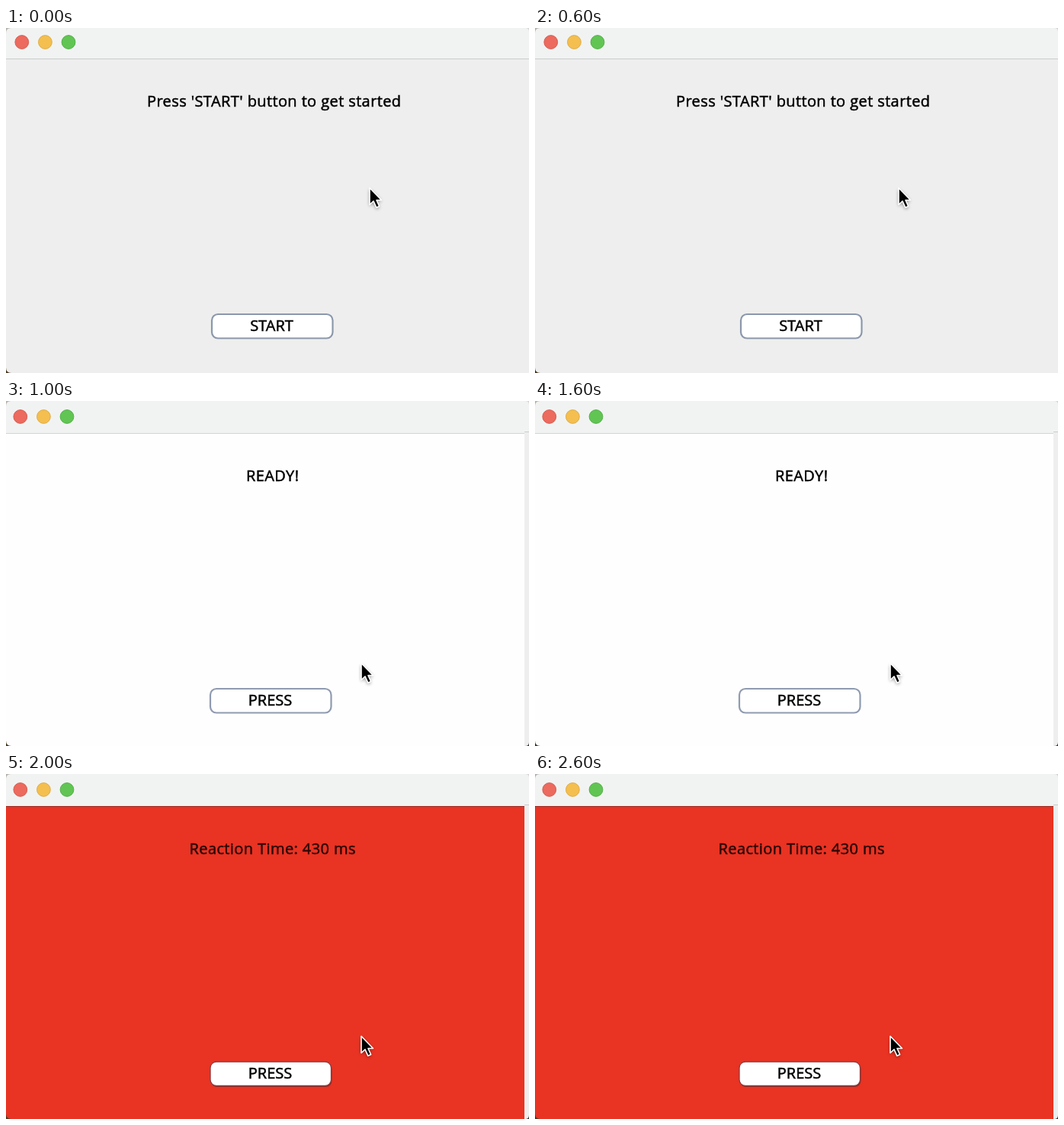
Recreate the animation shown at these times as an HTML page with a canvas. Size 686 by 452 pixels, loop 3000 ms.

```html
<!DOCTYPE html>
<html lang="en">
<head>
<meta charset="utf-8">
<title>Reaction timer</title>
<style>
html, body { margin: 0; width: 100%; height: 100%; overflow: hidden; background: #eee; }
canvas { display: block; }
</style>
</head>
<body>
<canvas id="stage" width="686" height="452"></canvas>
<script>
const W = 686, H = 452, STEP = 1000;
const ctx = document.getElementById("stage").getContext("2d");

const scenes = [
  { fill: "#eeeeee", rule: "#cbcccc", title: "Press 'START' button to get started",
    button: "START", border: "#8b98ac", dx: 0, dy: 0, cursor: [476, 208] },
  { fill: "#fefefe", rule: "#d3d5d4", title: "READY!",
    button: "PRESS", border: "#8f9bb0", dx: -2, dy: 2, cursor: [465, 342] },
  { fill: "#e93323", rule: "#982a20", title: "Reaction Time: 430 ms", ink: "#2a0704",
    button: "PRESS", border: "#8c3a3c", dx: -2, dy: 2, cursor: [465, 342] }
];

function rect(color, x, y, w, h) {
  ctx.fillStyle = color;
  ctx.fillRect(x, y, w, h);
}

function label(text, x, y, spacing, color = "#000") {
  ctx.font = '20px "Open Sans", "Noto Sans", sans-serif';
  ctx.letterSpacing = spacing + "px";
  ctx.textAlign = "center";
  ctx.fillStyle = ctx.strokeStyle = color;
  ctx.lineWidth = 0.5;
  ctx.fillText(text, x, y);
  ctx.strokeText(text, x, y);
}

function light(x, y, fill, edge) {
  ctx.beginPath();
  ctx.arc(x, y, 8.9, 0, Math.PI * 2);
  ctx.fillStyle = fill;
  ctx.fill();
  ctx.strokeStyle = edge;
  ctx.lineWidth = 0.9;
  ctx.stroke();
}

function corner(x, y, sx, sy, r, color) {
  ctx.beginPath();
  ctx.moveTo(x, y);
  ctx.lineTo(x + sx * r, y);
  ctx.quadraticCurveTo(x, y, x, y + sy * r);
  ctx.fillStyle = color;
  ctx.fill();
}

function button({ button: text, border, dx, dy, ink }) {
  const x = 269 + dx, y = 374 + dy;
  if (ink) {
    ctx.beginPath();
    ctx.roundRect(x + 1.5, y + 2, 159, 32, 8);
    ctx.fillStyle = "#8d2a25";
    ctx.fill();
  }
  ctx.beginPath();
  ctx.roundRect(x + 1, y + 1, 158.5, 31.5, 8);
  ctx.fillStyle = "#fff";
  ctx.fill();
  ctx.strokeStyle = border;
  ctx.lineWidth = ink ? 1.3 : 2.2;
  ctx.stroke();
  label(text, 348.5 + dx, 397 + dy, 0);
}

function pointer([x, y]) {
  const arrow = new Path2D("M1 1.5V23.5L6 18.8L9.8 27.2L13.6 25.5L10 17.5H16.5Z");
  ctx.save();
  ctx.translate(x, y);
  ctx.lineJoin = "round";
  ctx.shadowColor = "rgba(0,0,0,.45)";
  ctx.shadowBlur = 4;
  ctx.shadowOffsetY = 2;
  ctx.fillStyle = "#000";
  ctx.fill(arrow);
  ctx.shadowColor = "transparent";
  ctx.strokeStyle = "#fff";
  ctx.lineWidth = 1.6;
  ctx.stroke(arrow);
  ctx.restore();
}

function draw(scene) {
  const { dx, dy } = scene;
  const right = dx ? 680 : W, bar = 40 + dy;
  rect("#eeeeee", 0, 0, W, H);
  rect("#f1f3f2", 0, 0, W, bar);
  if (dx) {
    rect("#cbcccc", right, 40, W - right, 1);
    rect("#eeeeee", right, 41, W - right, H);
  }
  rect(scene.fill, 0, bar, right, H - bar);
  rect(scene.rule, 0, bar, right, 1);

  light(20.8 + dx, 18.5 + dy, "#ec6a5e", "#d4574c");
  light(51.4 + dx, 18.5 + dy, "#f4bf4f", "#dca73d");
  light(82 + dx, 18.5 + dy, "#61c554", "#4cad40");

  corner(0, 0, 1, 1, 7, "#b9b5ae");
  corner(W, 0, -1, 1, 5, "#d5d4d1");
  corner(0, H, 1, -1, 7, "#4a3a22");
  if (dx) corner(W, H, -1, -1, 5, "#3b3b3b");

  label(scene.title, 351.7 + dx, 103 + dy, 0.4, scene.ink);
  button(scene);
  pointer(scene.cursor);
}

function tick(now) {
  draw(scenes[Math.floor(now / STEP) % scenes.length]);
  requestAnimationFrame(tick);
}

draw(scenes[0]);
requestAnimationFrame(tick);
</script>
</body>
</html>
```
